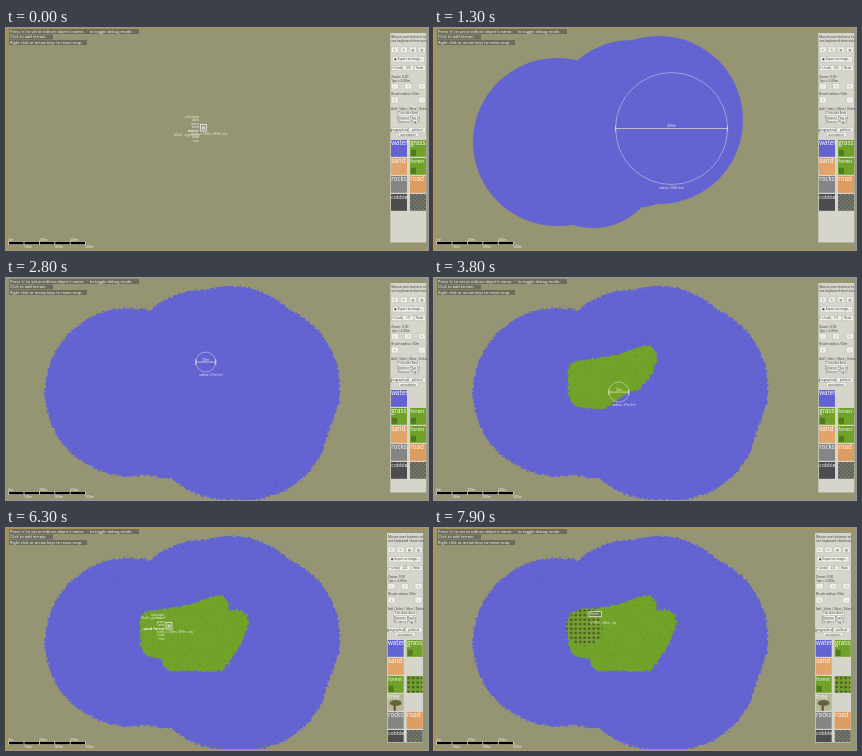
An HTML page that plays this animation: 422x222 px, repeating every 8000 ms.

```html
<!DOCTYPE html>
<html lang="en">
<head>
<meta charset="utf-8">
<title>Map painter</title>
<style>
html, body { margin: 0; width: 100%; height: 100%; overflow: hidden; background: #959573; }
svg { display: block; width: 100vw; height: 100vh; font-family: "Open Sans", "Noto Sans", sans-serif; }
svg svg { width: auto; height: auto; }
text { white-space: pre; }
</style>
</head>
<body>
<svg id="stage" viewBox="0 0 422 222">
  <defs>
    <pattern id="water" width="7" height="6" patternUnits="userSpaceOnUse">
      <rect width="7" height="6" fill="#6363d1"/>
      <path d="M1 1.5h2M4 4.5h2" stroke="#5f5fcb" stroke-width=".7"/>
    </pattern>
    <pattern id="grass" width="5" height="5" patternUnits="userSpaceOnUse">
      <rect width="5" height="5" fill="#72a42a"/>
      <path d="M1 1h1.5M3.5 2.5h1M1.5 4h1" stroke="#679725"/>
    </pattern>
    <pattern id="trees" width="4.5" height="4.5" patternUnits="userSpaceOnUse">
      <rect width="4.5" height="4.5" fill="#74a02e"/>
      <path d="M1 1.6h2.4" stroke="#39461f" stroke-width="1.7"/>
      <path d="M2.2 2.4v1.4" stroke="#857f48"/>
    </pattern>
    <pattern id="stones" width="4" height="4" patternUnits="userSpaceOnUse">
      <rect width="4" height="4" fill="#62645c"/>
      <path d="M0 1h2M2 3h2" stroke="#85897a"/>
    </pattern>
    <filter id="rough" filterUnits="userSpaceOnUse" x="0" y="0" width="422" height="222">
      <feTurbulence type="fractalNoise" baseFrequency=".4" numOctaves="2" seed="4"/>
      <feDisplacementMap in="SourceGraphic" scale="5" xChannelSelector="R" yChannelSelector="G"/>
    </filter>
  </defs>
  <rect width="422" height="222" fill="#959573"/>
  <g id="lake" fill="url(#water)"></g>
  <g stroke-linejoin="round" stroke-linecap="round">
    <polyline id="meadow" fill="url(#grass)" stroke="url(#grass)" stroke-width="25" filter="url(#rough)"/>
    <polyline id="forest" fill="url(#trees)" stroke="url(#trees)" stroke-width="6"/>
  </g>
  <g id="brush" fill="none" stroke="#e6e6e2" stroke-width=".7"></g>
  <g id="menu"></g>
  <g id="help"></g>
  <g id="ruler"></g>
  <g id="panels"></g>
  <rect id="focus" x=".5" y=".5" width="421" height="221" fill="none" stroke="#b0904a"/>
</svg>
<script>
const LOOP = 8000;
const $ = id => document.getElementById(id);
const show = (el, on) => el.setAttribute('display', on ? 'inline' : 'none');
const rect = (x, y, w, h, fill, more = '') =>
  `<rect x="${x}" y="${y}" width="${w}" height="${h}" fill="${fill}" ${more}/>`;
const text = (x, y, size, str, fill = '#fff', more = '') =>
  `<text x="${x}" y="${y}" font-size="${size}" fill="${fill}" stroke="none" ${more}>${str}</text>`;
const middle = 'text-anchor="middle"';

// A stroke visits its points at a steady beat.
const lakeStroke = { start: 514, step: 143, points: [
  [200, 100], [171, 114], [159, 133], [123, 114], [198, 96],
  [225, 92], [250, 109], [240, 138], [222, 138], [212, 117]] };
const meadowStroke = { start: 2720, step: 180, points: [
  [211, 80], [186, 89], [146, 95], [147, 117], [166, 119], [207, 90],
  [185, 114], [168, 131], [210, 131], [224, 110], [230, 94], [195, 110]] };
const leaveStroke = { start: 4800, step: 400, points: [[195, 110], [382, 156]] };

const spiral = k => {
  const angle = -0.95 + (k - 1) * 6 * Math.PI;
  const r = 17 * Math.sqrt(k);
  return [151 + r * Math.cos(angle), 100 + r * Math.sin(angle)];
};
const forestStroke = { start: 6500, step: 20, points: Array.from({ length: 70 }, (_, i) => spiral(i / 69)) };

function pointAt({ start, step, points }, t) {
  const pos = Math.min(Math.max((t - start) / step, 0), points.length - 1);
  const i = Math.floor(pos);
  const a = points[i], b = points[i + 1] || a;
  return a.map((v, axis) => v + (b[axis] - v) * (pos - i));
}

function paint(el, stroke, t) {
  const count = Math.floor((t - stroke.start) / stroke.step) + 1;
  show(el, count > 0);
  if (count > 0) el.setAttribute('points', [...stroke.points.slice(0, count), pointAt(stroke, t)].join(' '));
}

function brushMarkup([x, y], r, color) {
  const wide = r > 20;
  return `<circle cx="${x}" cy="${y}" r="${r}" stroke-opacity=".65"/>
    <path d="M${x - r} ${y}h${2 * r}M${x - r} ${y - 3}v6M${x + r} ${y - 3}v6" stroke="${color}"/>` +
    text(x, y - 1.3, 3.4, wide ? '400m' : '74m', '#f2f2e8', middle) +
    text(wide ? x : x + 5, y + r + 4.2, 3.2, `radius: ${wide ? 200 : 37}m (m)`, '#f2f2e8', middle);
}

function menuMarkup(x, y, current) {
  const names = ['unknown', 'label', 'grass', 'sand', current, 'rocks', 'road', 'tree'];
  return names.map((n, i) => text(x, y - 11 + i * 3.4, n === current ? 3.8 : 3.2, n, '#f4f4ec',
    `text-anchor="end" ${n === current ? 'font-weight="700"' : ''}`)).join('') +
    rect(x + 1.5, y - 4.5, 6, 6.5, 'none', 'stroke="#eee" stroke-width=".8"') +
    rect(x + 3, y - 2.5, 3, 3, '#d8d8c8') +
    text(x + 1, y + 6, 3.2, 'x 190m, 389m, obj', '#f0f0e6');
}

const swatches = {
  water: 'url(#water)', grass: 'url(#grass)', sand: '#e2a468', forest: 'url(#grass)', rocks: '#858585',
  road: '#dd9c60', cobble: '#4d4d4f', stones: 'url(#stones)', tree: '#b5b59b', woods: 'url(#trees)'
};

function tile(x, y, name) {
  const h = Math.min(16.8, 214 - y);
  const art = name === 'tree'
    ? `<path d="M${x + 7} ${y + h}v-8" stroke="#65482b" stroke-width="2"/>
       <ellipse cx="${x + 8}" cy="${y + 9}" rx="6" ry="3" fill="#68643a"/>`
    : /grass|forest/.test(name) ? rect(x + 1, y + h - 7, 5, 6, '#517a20') : '';
  const label = /stones|woods/.test(name) ? '' : text(x + .3, y + 5.3, Math.min(6.3, 31 / name.length), name);
  return rect(x, y, 16, h, swatches[name]) + art + label;
}

function panelMarkup(x, rows, history) {
  const ink = '#3c3c39';
  const button = (bx, y, w, h, label) =>
    rect(bx, y, w, h, '#efefea', 'stroke="#b2b2aa" stroke-width=".4"') +
    text(bx + w / 2, y + h / 2 + 1.1, 3, label, ink, middle);
  const buttons = (y, labels, w = 7, h = 5.5) => labels.map((label, i) =>
    button(x + 1 + (labels.length > 1 ? i / (labels.length - 1) : .5) * (34 - w), y, w, h, label)).join('');
  const line = (y, str, size = 3.3) => text(x + 1, y, size, str, ink);
  const tools = ['Calculate Area', 'Distance Plug In', 'Distance Plug II'];
  const tiles = rows.map((row, i) => row.split(' ').map((name, col) =>
    tile(x + .7 + 19 * col, 112 + 18 * i, name)).join('')).join('');
  return '<g>' + rect(x, 5, 36, 209.5, '#d5d5cc') +
    line(10, 'Mouse over buttons to') + line(14.3, 'see keyboard shortcuts') +
    buttons(19, [...'↖✎▤▥']) + buttons(28.5, ['▣ Export as image...'], 32) +
    buttons(37.5, ['↶ Undo', history, 'Redo'], 11, 5) +
    line(50, 'Zoom: 0.50') + line(54.3, '1px = 2.00m') + buttons(55.5, [...'-○+']) +
    line(67, 'Brush radius: 50m') + buttons(69, [...'+-'], 7, 6) +
    line(82, 'Add | Select | Move | Delete', 2.7) +
    tools.map((s, i) => buttons(83.3 + 4.2 * i, [s], 22, 4)).join('') +
    buttons(99.5, ['geographical', 'political'], 16.5, 4.5) + buttons(104.4, ['annotation'], 20, 4) +
    tiles + '</g>';
}

$('lake').innerHTML = lakeStroke.points.map(([x, y], i) =>
  `<circle cx="${x}" cy="${y}" r="${i < 3 ? 67 : 84}"/>`).join('');

$('help').innerHTML = [
  [130, "Press 'n' to set or edit an object's name.  ` to toggle debug mode."],
  [44, 'Click to add terrain.'],
  [78, 'Right click or arrow keys to move map.']
].map(([w, str], i) => rect(3, 1 + 5.5 * i, w, 5, '#6c6c5c') + text(4, 4.9 + 5.5 * i, 4.05, str)).join('');

const marks = [0, 1, 2, 3, 4, 5];
$('ruler').innerHTML = rect(2.5, 213.8, 77, 2.6, '#000', 'stroke="#ccc" stroke-width=".4"') +
  marks.map(i => rect(2.2 + 15.4 * i, 213.5, .8, 3.2, '#ddd') +
    text(2.5 + 15.4 * i, i % 2 ? 220 : 212.8, 3.1, `${i * 100}m`)).join('');

$('panels').innerHTML =
  panelMarkup(384.3, ['water grass', 'sand forest', 'rocks road', 'cobble stones'], '0/0') +
  panelMarkup(384.3, ['water', 'grass forest', 'sand forest', 'rocks road', 'cobble stones'], '1/1') +
  panelMarkup(381, ['water grass', 'sand', 'forest woods', 'tree', 'rocks road', 'cobble stones'], '2/2');

function drawMenu(t) {
  if (t < 100) return menuMarkup(193, 101, 'water') + text(168, 108, 3.2, 'Multi - vegetation', '#f0f0e6');
  if (t < 5900) return '';
  if (t < 6500) return menuMarkup(158.5, 99, 'sand forest') + text(135, 91, 3.2, 'Multi - grass', '#f0f0e6');
  const [x, y] = pointAt(forestStroke, t);
  return rect(x - 6, y - 2.5, 12.5, 5, '#6b7745', 'stroke="#f0f0e8" stroke-width=".7"') +
    text(x - 5, y + 1.1, 3.2, 'forest') + text(x - 5, y + 10, 3.1, 'x 155m, 340m, obj', '#e8e8da');
}

function drawBrush(t) {
  if (t < 100 || t >= 5500) return '';
  if (t < 2100) return brushMarkup(pointAt(lakeStroke, t), 56, t < 1000 ? '#f0f0ec' : '#ecebb0');
  if (t < 2600) return '';
  return brushMarkup(pointAt(t < leaveStroke.start ? meadowStroke : leaveStroke, t), 10, '#ecebc8');
}

function render(t) {
  [...$('lake').children].forEach((c, i) => show(c, t > lakeStroke.start + lakeStroke.step * i + 20));
  $('lake').setAttribute('filter', t < 1900 ? 'none' : 'url(#rough)');
  paint($('meadow'), meadowStroke, t - 100);
  paint($('forest'), forestStroke, t);
  $('brush').innerHTML = drawBrush(t);
  $('menu').innerHTML = drawMenu(t);
  const stage = t < 2300 ? 0 : t < 5600 ? 1 : 2;
  [...$('panels').children].forEach((p, i) => show(p, i === stage));
  show($('focus'), t < 2100 || t >= 5600);
}

const start = performance.now();
function tick() {
  render((performance.now() - start) % LOOP);
  requestAnimationFrame(tick);
}
tick();
</script>
</body>
</html>
```
